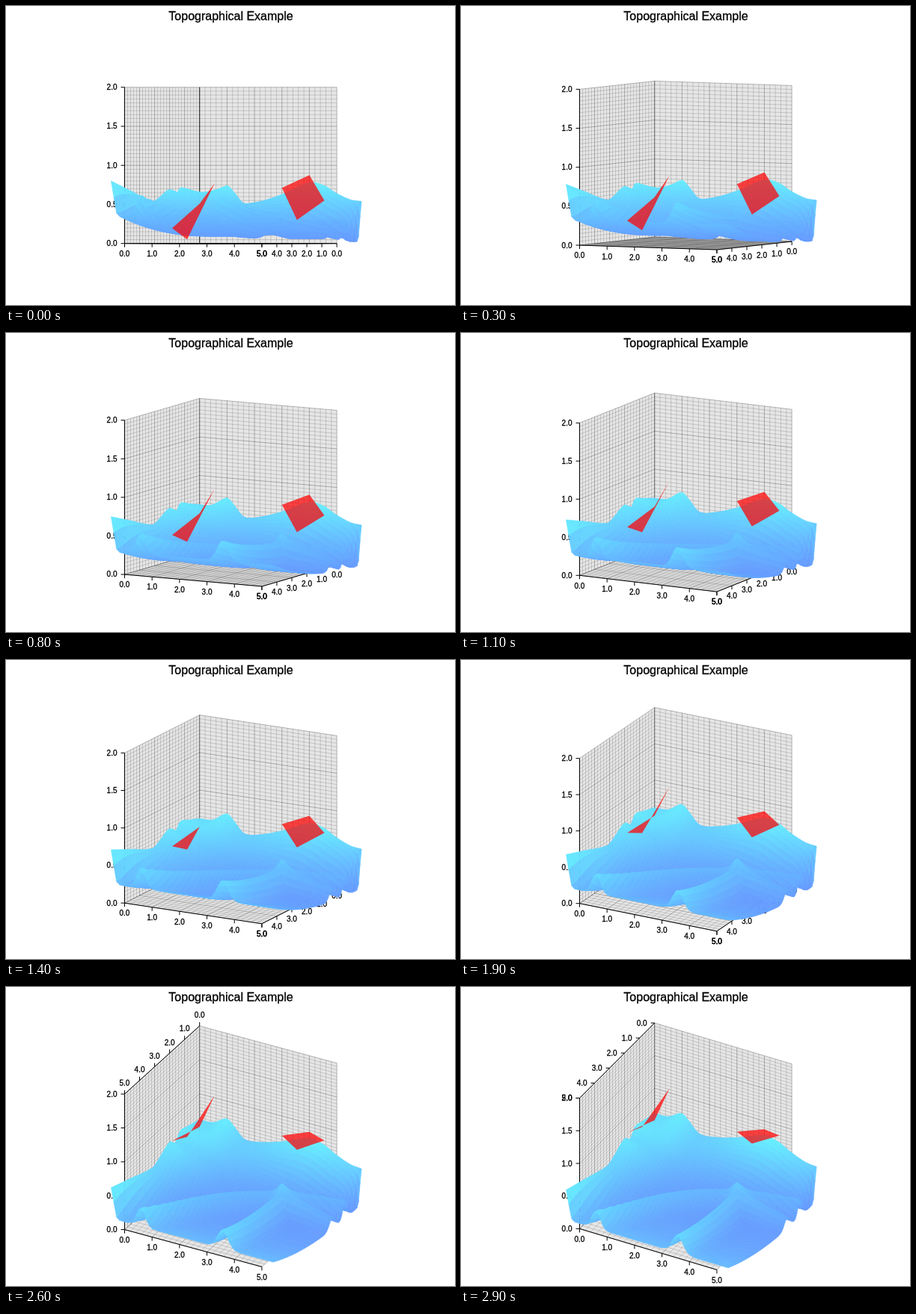
Recreate the animation shown at these times as an HTML page with a canvas. Size 600 px wide and 400 px high, loop 3100 ms.

```html
<!DOCTYPE html>
<html lang="en">
<head>
<meta charset="utf-8">
<title>Topographical Example</title>
<style>
html, body { margin: 0; width: 100%; height: 100%; overflow: hidden; background: #fff; }
svg, canvas { position: absolute; left: 0; top: 0; width: 600px; height: 400px; }
text { font: 10px "Liberation Sans", Arial, sans-serif; fill: #000; stroke: #000; stroke-width: .3px; }
#title { font-size: 16px; text-anchor: middle; }
path { fill: none; stroke: #000; }
#walls { fill: #e6e6e6; stroke: none; }
#minor { stroke-opacity: .15; }
#major { stroke-opacity: .27; }
</style>
</head>
<body>
<svg viewBox="0 0 600 400">
  <path id="walls"/><path id="minor"/><path id="major"/><path id="corner"/><path id="axes"/>
  <g id="labels"></g>
  <text id="title" x="300.5" y="19">Topographical Example</text>
</svg>
<canvas id="surface" width="600" height="400"></canvas>
<script>
const STEP = 100, STEPS = 30, LOOP = 3100;
const SIZE = 209, YAW = 0.5, PITCH_STEP = 0.02;
const N = 59;
const $ = id => document.getElementById(id);
const ctx = $('surface').getContext('2d');
const sinYaw = Math.sin(YAW), cosYaw = Math.cos(YAW);
let sinP = 0, cosP = 1;

// x and z run 0..5, y runs 0..2 inside the cube
function project(x, y, z) {
  const u = x / 5 - 0.5, v = y / 2 - 0.5, w = z / 5 - 0.5;
  const depth = u * sinYaw + w * cosYaw;
  return [
    300.3 + SIZE * (u * cosYaw - w * sinYaw),
    213.2 + SIZE * (depth * sinP - v * cosP)
  ];
}

const bell = d => Math.exp(-d * d);

// Catmull-Rom style curve through [position, value] pairs
function curve(pts, t) {
  let i = 0;
  while (i < pts.length - 2 && t > pts[i + 1][0]) i++;
  const slope = j => {
    const a = pts[Math.max(0, j - 1)], b = pts[Math.min(pts.length - 1, j + 1)];
    return (b[1] - a[1]) / (b[0] - a[0]);
  };
  const [t0, v0] = pts[i], [t1, v1] = pts[i + 1];
  const d = t1 - t0, s = (t - t0) / d, r = 1 - s;
  return v0 * (1 + 2 * s) * r * r + slope(i) * d * s * r * r
    + v1 * s * s * (3 - 2 * s) - slope(i + 1) * d * s * s * r;
}

const leftRim = [[0, .62], [.8, .68], [1.3, .71], [1.65, .6], [2, .69],
  [2.75, .58], [3.15, .54], [4.65, .68], [5.9, .8]];
const backRim = [[0, .62], [.5, .63], [1, .74], [1.28, .645], [1.63, .51],
  [2.23, .53], [3.05, .63], [4, .78], [4.55, .74], [4.95, .65], [5.5, .56], [5.9, .54]];

// Distance to the L-shaped ridge
function ridgeDistance(x, z) {
  const dx = x - 4.07, dz = z - 1.95;
  if (dx > 0 && dz > 0) return Math.min(dx, dz);
  if (dz > 0) return -dx;
  if (dx > 0) return -dz;
  return Math.hypot(dx, dz);
}

function height(x, z) {
  const p = x * z;
  const floor = 0.02 + 0.33 * Math.pow(z / 5.9, 2.5);
  const side = x + z ? z / (x + z) : 0;
  const rim = curve(leftRim, z) * side + curve(backRim, x) * (1 - side);
  const squeeze = Math.max(0, (x - 5.3) / 0.6);
  const reach = (3.4 - 0.45 * z) * (1 - 0.75 * squeeze * squeeze);
  const fall = bell(p / reach);
  const amp = 0.36 - 0.023 * Math.max(0, z - 2) - 0.1 * Math.max(0, x - 4);
  return floor * (1 - fall) + rim * fall
    + 0.27 * bell((p - 6.4) / 1.3)
    + amp * bell(ridgeDistance(x, z) / 0.28);
}

const land = [];
for (let j = 0; j <= N; j++) {
  land.push([]);
  for (let i = 0; i <= N; i++) land[j].push(height(i / 10, j / 10));
}

function shade(h) {
  const t = Math.min(1, Math.max(0, h / 0.78));
  return `rgb(102,${Math.round(152 + 90 * Math.pow(t, 1.15))},255)`;
}

function fillPoly(pts) {
  ctx.beginPath();
  pts.forEach(p => ctx.lineTo(p[0], p[1]));
  ctx.closePath();
  ctx.fill();
}

const patches = [
  [[-1, .196, 0], [0, .51, 0], [0, .77, -1], [-1, .053, -1]],
  [[3, .713, 0], [4, .876, 0], [4, .55, -1], [3, .3, -1]]
];

function drawSurface() {
  ctx.clearRect(0, 0, 600, 400);
  ctx.lineWidth = 0.6;
  const pts = land.map((row, j) => row.map((h, i) => project(i / 10, h, j / 10)));
  for (let j = 0; j < N; j++) {
    for (let i = 0; i < N; i++) {
      const mean = (land[j][i] + land[j][i + 1] + land[j + 1][i] + land[j + 1][i + 1]) / 4;
      ctx.fillStyle = ctx.strokeStyle = shade(mean);
      fillPoly([pts[j][i], pts[j][i + 1], pts[j + 1][i + 1], pts[j + 1][i]]);
      ctx.stroke();
    }
  }
  ctx.fillStyle = 'rgba(255,0,0,.72)';
  patches.forEach(q => fillPoly(q.map(v => project(...v))));
}

const fmt = p => p[0].toFixed(2) + ' ' + p[1].toFixed(2);
const seg = (a, b) => `M${fmt(project(...a))}L${fmt(project(...b))}`;
const face = (...vs) => 'M' + vs.map(v => fmt(project(...v))).join('L') + 'Z';

function drawGrid(step) {
  $('walls').setAttribute('d',
    face([0, 0, 0], [5, 0, 0], [5, 2, 0], [0, 2, 0]) +
    face([0, 0, 0], [0, 0, 5], [0, 2, 5], [0, 2, 0]) +
    face([0, 0, 0], [5, 0, 0], [5, 0, 5], [0, 0, 5]));
  const lines = ['', ''];
  for (let i = 0; i <= 25; i++) {
    const a = i / 5, big = i % 5 ? 0 : 1;
    lines[big] += seg([a, 0, 0], [a, 2, 0]) + seg([a, 0, 0], [a, 0, 5])
      + seg([0, 0, a], [0, 2, a]) + seg([0, 0, a], [5, 0, a]);
  }
  for (let i = 0; i <= 40; i++) {
    const y = i / 20, big = i % 10 ? 0 : 1;
    lines[big] += seg([0, y, 0], [5, y, 0]) + seg([0, y, 0], [0, y, 5]);
  }
  $('minor').setAttribute('d', lines[0]);
  $('major').setAttribute('d', lines[1]);
  $('corner').setAttribute('d', seg([0, 0, 0], [0, 2, 0]));
  $('corner').setAttribute('stroke-opacity', step ? 0.15 : 0.7);
}

const labels = [];
for (let i = 0; i < 17; i++) {
  const el = document.createElementNS('http://www.w3.org/2000/svg', 'text');
  $('labels').appendChild(el);
  labels.push(el);
}

const sides = {
  below: { tick: [0, 5], text: [0, 17.3], anchor: 'middle' },
  above: { tick: [0, -5], text: [0, -11], anchor: 'middle' },
  left: { tick: [-5, 0], text: [-10, 3.5], anchor: 'end' }
};

function drawAxes(step) {
  let used = 0, d = '';
  const axis = (at, count, unit, side) => {
    const s = sides[side];
    d += seg(at(0), at(count * unit));
    for (let i = 0; i <= count; i++) {
      const [x, y] = project(...at(i * unit));
      d += `M${fmt([x, y])}l${s.tick.join(' ')}`;
      const el = labels[used++];
      el.textContent = (i * unit).toFixed(1);
      el.setAttribute('x', x + s.text[0]);
      el.setAttribute('y', y + s.text[1]);
      el.setAttribute('text-anchor', s.anchor);
    }
  };
  axis(v => [v, 0, 5], 5, 1, 'below');
  axis(v => [0, v, 5], 4, 0.5, 'left');
  // The depth axis moves to the upper edge once the box tilts enough
  const steep = cosYaw * sinP > sinYaw;
  if (step < 21) axis(v => [5, 0, v], 5, 1, 'below');
  else axis(v => [0, 2, v], 5, 1, steep ? 'left' : 'above');
  $('axes').setAttribute('d', d);
}

let shown = -1;
function render(time) {
  const step = Math.min(STEPS - 1, Math.floor((time % LOOP) / STEP));
  if (step === shown) return;
  shown = step;
  sinP = Math.sin(step * PITCH_STEP);
  cosP = Math.cos(step * PITCH_STEP);
  drawGrid(step);
  drawAxes(step);
  drawSurface();
}

let start;
function loop(now) {
  if (start === undefined) start = now;
  render(Math.max(0, now - start));
  requestAnimationFrame(loop);
}
render(0);
requestAnimationFrame(loop);
</script>
</body>
</html>
```
